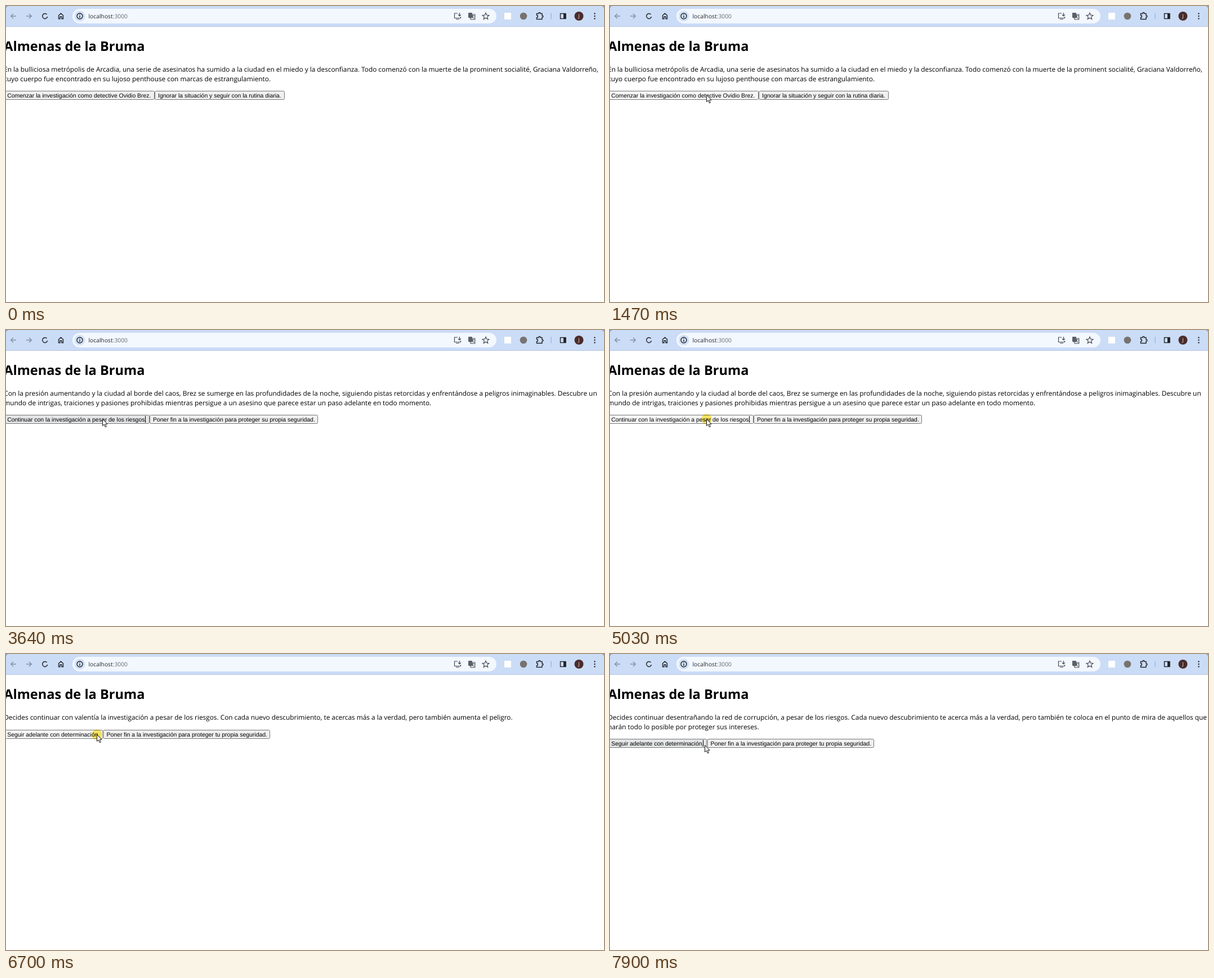
Recreate the animation shown at these times as an HTML page. Size 1062 px wide and 527 px high, loop 8 s.

```html
<!DOCTYPE html>
<html lang="es">
<head>
<meta charset="utf-8">
<title>Almenas de la Bruma</title>
<style>
  html, body { margin: 0; width: 100%; height: 100%; overflow: hidden; background: #fff; }
  svg { display: block; width: 1062px; height: 527px; }
  text { white-space: pre; text-rendering: geometricPrecision; }
  .ui { font-family: "Open Sans", "Noto Sans", sans-serif; }
  .story { font-size: 11.83px; }
  .btn text { font: 10.45px "Liberation Sans", Arial, sans-serif; }
  .btn rect { fill: #efefef; stroke: #767676; }
  .line { fill: none; stroke: #20242a; stroke-width: 1.4; }
  .soft { stroke: #858f9f; }
  .mid { stroke: #454a52; stroke-width: 1.2; }
  #spot { fill: #ffe94a; opacity: .85; mix-blend-mode: multiply; }
</style>
</head>
<body>
<svg viewBox="0 0 1062 527">
  <rect width="1062" height="527" fill="#fff"/>

  <!-- browser bar -->
  <rect width="1062" height="37" fill="#cbdcf7"/>
  <rect y="36" width="1062" height="1" fill="#b4c3dc"/>
  <path d="M0 0H4Q1 1 0 4ZM1062 0H1058Q1061 1 1062 4Z" fill="#8fa3c4"/>
  <rect x="118" y="5" width="753" height="26" rx="13" fill="#f3f7fe"/>
  <circle cx="131" cy="18" r="9.5" fill="#d3e1f8"/>
  <g class="line">
    <path class="soft" d="M18 18H9M13 13.7L8.7 18L13 22.3M36 18H45M41 13.7L45.3 18L41 22.3"/>
    <path d="M72.6 15A4.5 4.5 0 1 0 73.6 19"/>
    <path d="M93.5 16.8V22.8H96V19H99V22.8H101.500V16.8L97.500 13.200Z"/>
    <circle cx="131" cy="18" r="5"/>
    <path d="M131 17.300V21M131 14.800V16.100"/>
    <g class="mid">
      <path d="M802 13H796.500V21.500H807.500V19M799 23.500H805M805.500 12V17.500M803 15.300L805.500 17.800L808 15.300"/>
      <path d="M826 15H832.700V24H825.500L824 21M826 17.500H831.500M829 16V17.500Q828.500 20 826 21.500M827 18.500L831 22"/>
      <path d="M852 12.300L853.700 16.200L857.900 16.600L854.700 19.400L855.700 23.500L852 21.300L848.300 23.500L849.300 19.400L846.100 16.600L850.300 16.200Z"/>
    </g>
    <path d="M942.500 13.500H946V13A1.500 1.500 0 0 1 949 13V13.500H952V17H952.500A1.500 1.500 0 0 1 952.500 20H952V23.500H942.500V20.500A2 2 0 0 0 942.500 16.500Z"/>
    <rect x="984.500" y="13.500" width="9.500" height="9"/>
  </g>
  <rect x="821" y="12" width="7" height="9" rx="1" fill="#5a6069"/>
  <rect x="885" y="12" width="12" height="12" fill="#fff"/>
  <circle cx="919" cy="18" r="6.300" fill="#77736f"/>
  <rect x="967.500" y="12.500" width="1.200" height="11" fill="#8fb2ee"/>
  <rect x="990" y="13" width="4.500" height="10" fill="#20242a"/>
  <circle cx="1017.500" cy="18" r="8" fill="#4b2c2b"/>
  <text class="ui" x="1017.500" y="21.300" font-size="9" fill="#f3ecec" text-anchor="middle">J</text>
  <g fill="#20242a">
    <circle cx="1045.500" cy="13.500" r="1.200"/><circle cx="1045.500" cy="18" r="1.200"/><circle cx="1045.500" cy="22.500" r="1.200"/>
  </g>
  <text class="ui" x="146.500" y="22" font-size="10.300" fill="#25282d">localhost<tspan fill="#666b73">:3000</tspan></text>

  <!-- page -->
  <text class="ui" x="-3.800" y="80.300" font-size="23.600" font-weight="700">Almenas de la Bruma</text>
  <text class="ui story" id="line1" x="-3.800" y="117.300"></text>
  <text class="ui story" id="line2" x="-3.800" y="133.600"></text>
  <g class="btn" id="buttons">
    <rect id="box1" x="-3.500" y="151.500" height="15" rx="2"/>
    <rect id="box2" y="151.500" height="15" rx="2"/>
    <text id="label1" x="2.200" y="162.700"></text>
    <text id="label2" y="162.700"></text>
    <path id="caret" stroke="#000" d="M.5 153V165"/>
  </g>
  <circle id="spot" r="9.300"/>
  <path id="cursor" fill="#fff" stroke="#111" stroke-width="1" stroke-linejoin="round"
        d="M0 0V12L2.800 9.500L4.900 14.300L6.900 13.400L4.800 8.800H8.500Z"/>
</svg>

<script>
const LOOP = 8000;
const $ = id => document.getElementById(id);

// start, text lines, button labels, right edges of both buttons, caret x
const pages = [
  { t: 0, edges: [264, 495], caret: 258, lines: [
    'En la bulliciosa metrópolis de Arcadia, una serie de asesinatos ha sumido a la ciudad en el miedo y la desconfianza. Todo comenzó con la muerte de la prominent socialité, Graciana Valdorreño,',
    'cuyo cuerpo fue encontrado en su lujoso penthouse con marcas de estrangulamiento.'],
    labels: ['Comenzar la investigación como detective Ovidio Brez.', 'Ignorar la situación y seguir con la rutina diaria.'] },
  { t: 1530, edges: [286, 543], caret: 278, lines: [
    'El detective Ovidio Brez se encuentra frente al desafío más oscuro de su carrera. Con cada nueva luna, un nuevo cuerpo aparece, cada uno más brutalmente asesinado que el anterior. La única',
    "pista que conecta a las víctimas es su participación en un antiguo club secreto llamado 'Las Almenas', un lugar donde los ricos y poderosos se entregan a sus deseos más oscuros."],
    labels: ['Seguir adelante con la investigación a pesar de los peligros.', 'Dejar la investigación para evitar riesgos personales.'] },
  { t: 3440, edges: [255, 554], caret: 247, lines: [
    'Con la presión aumentando y la ciudad al borde del caos, Brez se sumerge en las profundidades de la noche, siguiendo pistas retorcidas y enfrentándose a peligros inimaginables. Descubre un',
    'mundo de intrigas, traiciones y pasiones prohibidas mientras persigue a un asesino que parece estar un paso adelante en todo momento.'],
    labels: ['Continuar con la investigación a pesar de los riesgos.', 'Poner fin a la investigación para proteger su propia seguridad.'] },
  { t: 5230, edges: [172.5, 469], caret: 165, lines: [
    'Decides continuar con valentía la investigación a pesar de los riesgos. Con cada nuevo descubrimiento, te acercas más a la verdad, pero también aumenta el peligro.', ''],
    labels: ['Seguir adelante con determinación.', 'Poner fin a la investigación para proteger tu propia seguridad.'] },
  { t: 6840, edges: [224, 437], caret: 216, lines: [
    'A medida que profundizas en la investigación, descubres una red de corrupción que se extiende hasta los niveles más altos del poder en Arcadia. Desde políticos corruptos hasta magnates sin',
    'escrúpulos, todos parecen tener algo que ocultar y están dispuestos a matar para proteger sus secretos.'],
    labels: ['Continuar desentrañando la red de corrupción.', 'Alejarte de la investigación para protegerte.'] },
  { t: 7900, edges: [172.5, 469], caret: 165, lines: [
    'Decides continuar desentrañando la red de corrupción, a pesar de los riesgos. Cada nuevo descubrimiento te acerca más a la verdad, pero también te coloca en el punto de mira de aquellos que',
    'harán todo lo posible por proteger sus intereses.'],
    labels: ['Seguir adelante con determinación.', 'Poner fin a la investigación para proteger tu propia seguridad.'] }
];

const REST = '#efefef', HOVER = '#e3e5e6', DOWN = '#f5f5f5';
const fills = [
  [0, REST], [930, HOVER], [1390, DOWN], [1530, HOVER], [3290, DOWN], [3440, HOVER], [5030, DOWN],
  [5230, REST], [6160, HOVER], [6700, DOWN], [6840, REST], [7235, HOVER], [7830, DOWN], [7900, HOVER]
].map(([t, fill]) => ({ t, fill }));

const blinks = [1530, 2060, 2610, 3090, 3640, 4170, 4700, 5230, 5760, 6300, 6840, 7300, 7900];
const clicks = [[1390, 1470], [3290, 3440], [5030, 5100], [6700, 6840], [7830, 7900]];

// pointer: an arc from the lower right, then short hops
const bezier = (u, a, b, c, d) => {
  const v = 1 - u;
  return v * v * v * a + 3 * v * v * u * b + 3 * v * u * u * c + u * u * u * d;
};
const moves = Array.from({ length: 12 }, (_, k) => {
  const s = k / 11, u = s * s * (3 - 2 * s);
  return { t: 70 + 790 * s, x: bezier(u, 1014, 800, 300, 172), y: bezier(u, 512, 69, 69, 157) };
}).concat([
  [930, 171.5, 158], [990, 171.5, 158.5],
  [6020, 171, 155], [6090, 169, 150], [6160, 166, 147], [6230, 163, 144.5], [6300, 161.5, 143.5],
  [7170, 164, 150], [7235, 167, 158], [7300, 168.5, 162.5]
].map(([t, x, y]) => ({ t, x, y })));

const latest = (steps, t) => steps.filter(s => s.t <= t).pop();
const show = (el, on) => el.setAttribute('visibility', on ? 'visible' : 'hidden');
const place = (el, x, y) => el.setAttribute('transform', `translate(${x} ${y})`);

let current;
function setPage(page) {
  if (page === current) return;
  current = page;
  const [mid, end] = page.edges;
  page.lines.forEach((s, i) => $('line' + (i + 1)).textContent = s);
  page.labels.forEach((s, i) => $('label' + (i + 1)).textContent = s);
  $('box1').setAttribute('width', mid + 3);
  $('box2').setAttribute('x', mid + .5);
  $('box2').setAttribute('width', end - mid - 1);
  $('label2').setAttribute('x', mid + 6);
  place($('caret'), page.caret, 0);
  place($('buttons'), 0, page.lines[1] ? 0 : -16);
}

function draw(t) {
  setPage(latest(pages, t));
  $('box1').style.fill = latest(fills, t).fill;
  show($('caret'), blinks.filter(b => b <= t).length % 2);
  show($('spot'), clicks.some(([a, b]) => t >= a && t < b));
  const p = latest(moves, t);
  show($('cursor'), p);
  if (p) {
    place($('cursor'), p.x, p.y);
    place($('spot'), p.x, p.y);
  }
}

const start = performance.now();
function frame() {
  draw((performance.now() - start) % LOOP);
  requestAnimationFrame(frame);
}
frame();
</script>
</body>
</html>
```
